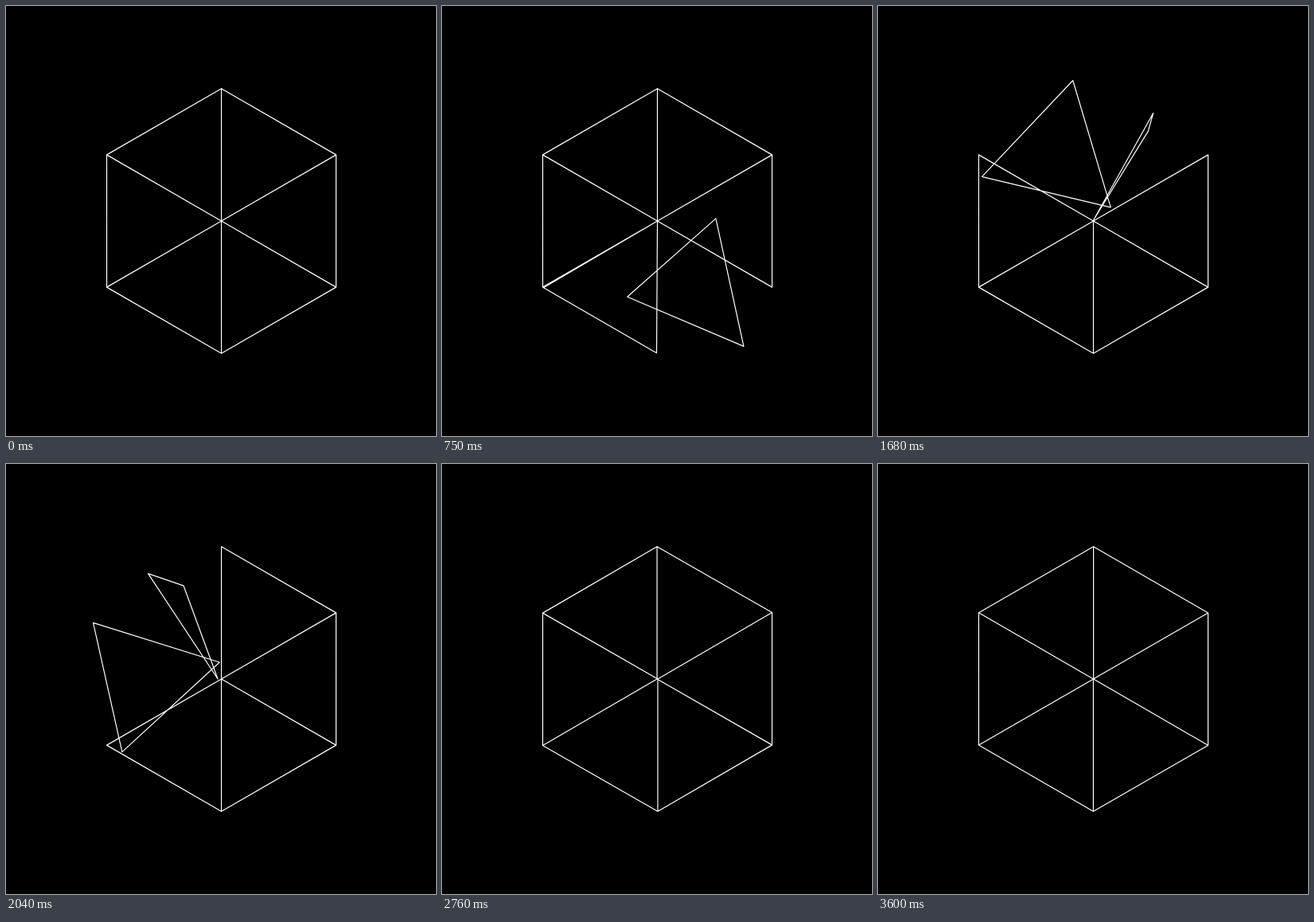
Animation of 540 by 540 pixels, one loop 3.63 s. Source, as an HTML page with a canvas:

```html
<!DOCTYPE html>
<html lang="en">
<head>
<meta charset="utf-8">
<title>Hexagon and cube</title>
<style>
  html, body { margin: 0; width: 100%; height: 100%; overflow: hidden; background: #000; }
  canvas { display: block; width: 540px; height: 540px; }
</style>
</head>
<body>
<canvas id="stage" width="540" height="540"></canvas>
<script>
const ctx = document.getElementById('stage').getContext('2d');
const LOOP = 3630, STEP = 30;
const CX = 270.5, CY = 270;
const HALF = 144;                 // half width of the hexagon
const R = HALF / Math.cos(Math.PI / 6);
const RHO = HALF * 2 / 3;         // triangle circumradius
const STAGGER = 382;
const SPIN = { at: 0, span: 603 };
const FLIP = { at: 208, span: 603 };
const TURN = { at: 2735, span: 877 };
const rad = deg => deg * Math.PI / 180;

// 0..1 share of a phase
const share = (t, { at, span }) => Math.min(1, Math.max(0, (t - at) / span));

const sine = u => (1 - Math.cos(Math.PI * u)) / 2;

// cubic-bezier(.34, 0, .79, 1): gentle start, firmer stop
function glide(u) {
  let lo = 0, hi = 1;
  for (let i = 0; i < 24; i++) {
    const k = (lo + hi) / 2, r = 1 - k;
    if (3 * r * r * k * .34 + 3 * r * k * k * .79 + k ** 3 < u) lo = k;
    else hi = k;
  }
  return lo * lo * (3 - 2 * lo);
}

function polygon(points) {
  points.forEach((p, i) => i ? ctx.lineTo(...p) : ctx.moveTo(...p));
  ctx.closePath();
}

// spins a third of a turn in its plane while flipping over its radial axis
function triangle(i, t) {
  const local = t - i * STAGGER;
  const spin = 120 * glide(share(local, SPIN));
  const squash = Math.cos(Math.PI * glide(share(local, FLIP)));
  const axis = rad(120 - 60 * i), c = Math.cos(axis), s = Math.sin(axis);
  polygon([180, 60, -60].map(deg => {
    const v = rad(deg - spin);
    const a = RHO + RHO * Math.cos(v), b = RHO * Math.sin(v) * squash;
    return [CX + a * c - b * s, CY + a * s + b * c];
  }));
}

// isometric wire cube, a quarter turn about its upright axis
function cube(t) {
  const turn = -90 * sine(share(t, TURN));
  const face = lift => [0, 90, 180, 270].map(deg => {
    const v = rad(deg + turn);
    return [CX + HALF * Math.sin(v), CY + lift - R / 2 * Math.cos(v)];
  });
  const top = face(-R / 2), base = face(R / 2);
  polygon(top);
  polygon(base);
  top.forEach((p, i) => {
    ctx.moveTo(...p);
    ctx.lineTo(...base[i]);
  });
}

function draw(now) {
  const t = Math.floor(now % LOOP / STEP) * STEP;
  ctx.fillStyle = '#000';
  ctx.fillRect(0, 0, 540, 540);
  ctx.strokeStyle = '#fff';
  ctx.lineWidth = 1.2;
  ctx.lineJoin = 'round';
  ctx.beginPath();
  if (t < TURN.at) for (let i = 0; i < 6; i++) triangle(i, t);
  else cube(t);
  ctx.stroke();
}

const start = performance.now();
function tick() {
  draw(performance.now() - start);
  requestAnimationFrame(tick);
}
tick();
</script>
</body>
</html>
```
